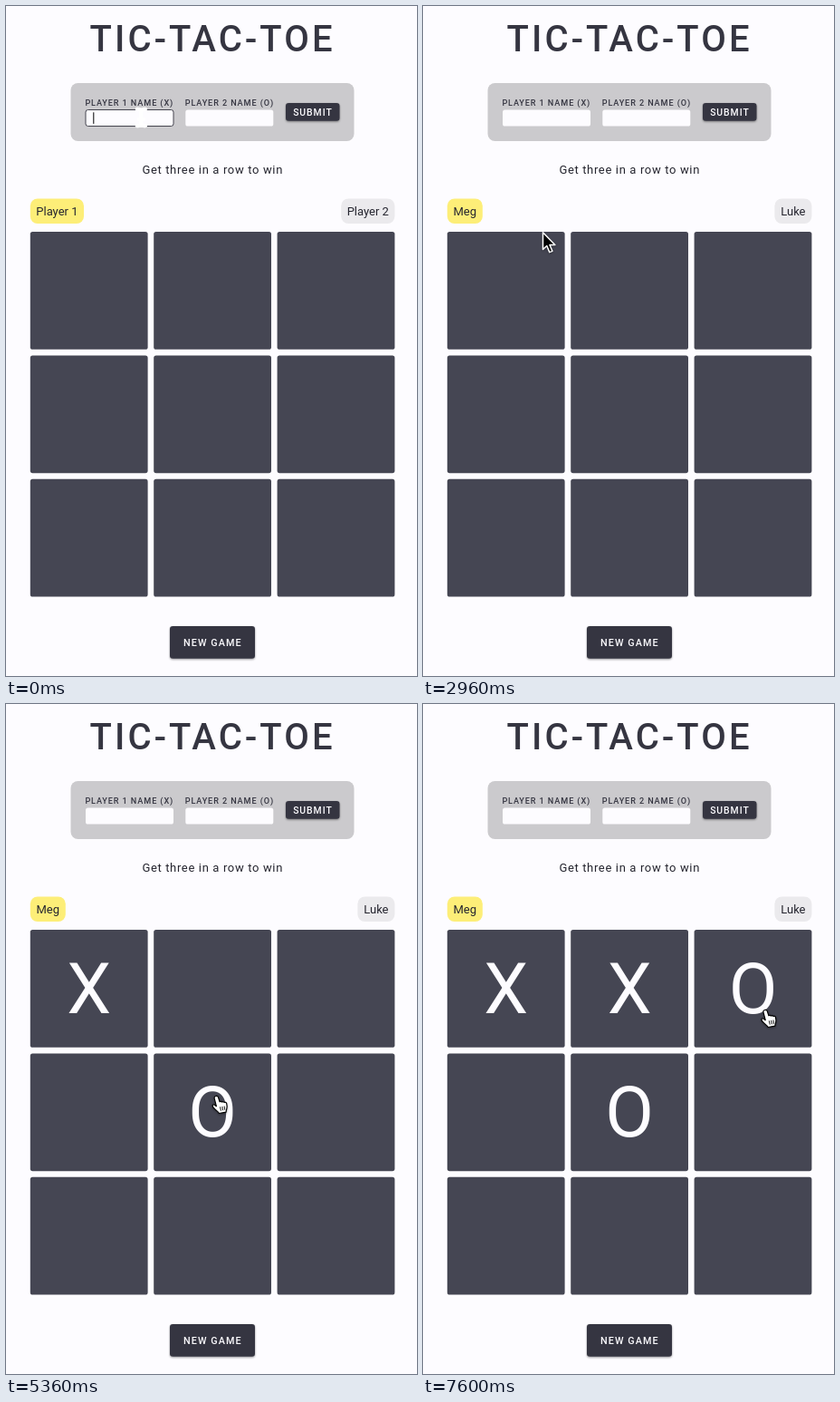
These frames come from a looping animation (454 by 739 pixels, 8000 ms). An HTML page:

```html
<!DOCTYPE html>
<html lang="en">
<head>
<meta charset="utf-8">
<title>Tic-Tac-Toe</title>
<style>
  html, body { margin: 0; width: 100%; height: 100%; overflow: hidden; background: #fdfcff; }
  svg { display: block; width: 100%; height: 100%; font-family: Roboto, sans-serif; }
  text { fill: #25252f; white-space: pre; }
  .mid { text-anchor: middle; }
  .title { font-size: 40px; font-weight: 500; letter-spacing: 3.2px; fill: #353541; }
  .label { font-size: 9.1px; font-weight: 500; letter-spacing: .91px; fill: #353541; }
  .hint { font-size: 13px; letter-spacing: .65px; }
  .name { font-size: 13px; }
  .typed { font-size: 12px; fill: #000; }
  .button rect { fill: #353541; filter: drop-shadow(0 1.5px 1.2px rgba(0, 0, 0, .42)); }
  .button text { fill: #fdfcff; font-weight: 500; }
  .mark { font-size: 78px; fill: #fdfcff; }
</style>
</head>
<body>
<svg id="stage" viewBox="0 0 454 739">
  <rect width="454" height="739" fill="#fdfcff"/>
  <text class="title mid" x="228.2" y="50">TIC-TAC-TOE</text>

  <rect x="71.5" y="85" width="313" height="64" rx="8" fill="#cbcacd"/>
  <text class="label" x="87.4" y="109.7">PLAYER 1 NAME (X)</text>
  <text class="label" x="197.7" y="109.7">PLAYER 2 NAME (O)</text>
  <g id="fields"></g>
  <rect id="caret" y="117.3" width="1" height="12.6" fill="#000"/>
  <g class="button">
    <rect id="submit" x="309" y="107" width="59.5" height="19.7" rx="3.3"/>
    <text class="mid" x="338.9" y="120.6" font-size="10.4" letter-spacing=".95">SUBMIT</text>
  </g>

  <text class="hint mid" x="228.2" y="185.4">Get three in a row to win</text>
  <g id="pills"></g>
  <g id="cells" fill="#454653"></g>
  <g id="marks"></g>

  <g class="button">
    <rect x="181" y="684" width="94" height="35.7" rx="3.3"/>
    <text class="mid" x="228.4" y="705.6" font-size="10.8" letter-spacing="1.08">NEW GAME</text>
  </g>

  <g id="pointer">
    <g id="beam" fill="none" stroke-linecap="round">
      <path id="beamShape" stroke="#fff" stroke-width="4"
        d="M-4.5 -9.3C-2 -9.3 0 -8.6 0 -6.8C0 -8.6 2 -9.3 4.5 -9.3M0 -6.8V6.8M-4.5 9.3C-2 9.3 0 8.6 0 6.8C0 8.6 2 9.3 4.5 9.3M-2.8 2H2.8"/>
      <use href="#beamShape" style="stroke:#000"/>
    </g>
    <path id="arrow" fill="#000" stroke="#fff" stroke-width="1.5" stroke-linejoin="round"
      style="filter:drop-shadow(0 1px 1px rgba(0,0,0,.35))"
      d="M.9 1V19.8L5.2 15.8L8.2 22.9L11.3 21.6L8.4 14.7H14.3Z"/>
    <g id="hand" transform="translate(-5.5 -.5)" stroke="#000" stroke-width="1.2"
      stroke-linejoin="round" stroke-linecap="round"
      style="filter:drop-shadow(0 1px .8px rgba(0,0,0,.35))">
      <path fill="#fff" d="M4.6 1C5.9.5 6.9 1.2 7.3 2.4L8.9 7.2C9.6 6.6 11 6.7 11.4 7.6C12.2 6.9 13.5 7.1 13.9 8C14.9 7.4 16.2 7.9 16.5 9.2C17 11.3 17.2 13.3 16.6 15C16.2 16.2 15.9 17 15.9 18.6L8.2 20C7.4 18.2 5.4 17 3.6 15.4C2.3 14.2 1 12.6.9 11.6C.9 10.3 2.3 9.9 3.4 10.7L5.2 12.2L3 3.6C2.6 2.4 3.3 1.4 4.6 1Z"/>
      <path fill="none" stroke-width=".9" d="M9.4 13.2l.8 3.6M11.7 12.8l.7 3.6M14 12.4l.5 3.5"/>
    </g>
  </g>
</svg>
<script>
const LOOP = 8000;
const SUBMIT_AT = 2040;
const LEFT = 26.8, RIGHT = 429.4, TOP = 249, PITCH = 136.4, CELL = 129.8;
const NAMES = ["Meg", "Luke"];
const NAME_WIDTHS = [39, 41];

const KEYS = [[40, 210, 380], [920, 1040, 1160, 1280]];
const FOCUS_SECOND = 680;
const MOVES = [[3320, 0, "X"], [4480, 4, "O"], [5960, 1, "X"], [7520, 2, "O"]];

const ease = {
  both: u => u * u * (3 - 2 * u),
  out: u => 1 - (1 - u) ** 2
};
// time, tip x, tip y, easing towards this stop
const PATH = [
  [0, 149.3, 123],
  [1320, 149.3, 123, "both"],
  [1780, 334.5, 118, "both"],
  [2700, 334.5, 118, "both"],
  [2960, 132, 248, "both"],
  [3080, 106, 292, "out"],
  [3620, 106, 292, "both"],
  [4040, 229.5, 461, "both"],
  [5260, 229.5, 461, "both"],
  [5600, 244.5, 324.5, "both"],
  [6380, 244.5, 324.5, "both"],
  [6840, 319.5, 517.5, "both"],
  [6900, 322, 521, "both"],
  [7200, 380, 342, "both"],
  [7320, 378.5, 337, "out"],
  [LOOP, 378.5, 337, "both"]
];

const $ = id => document.getElementById(id);

function add(parent, tag, attrs) {
  const el = document.createElementNS("http://www.w3.org/2000/svg", tag);
  for (const k in attrs) el.setAttribute(k, attrs[k]);
  return parent.appendChild(el);
}

const show = (el, on) => el.setAttribute("visibility", on ? "visible" : "hidden");

const fields = [88, 198.3].map(x => ({
  x,
  box: add($("fields"), "rect", { x, y: 114.5, width: 97, height: 18, rx: 2.6, fill: "#fdfcff" }),
  text: add($("fields"), "text", { class: "typed", x: x + 8, y: 127.7 })
}));

const pills = [0, 1].map(() => ({
  box: add($("pills"), "rect", { y: 212.5, height: 27.6, rx: 8 }),
  text: add($("pills"), "text", { class: "name mid", y: 231.3 })
}));

const cellPos = i => [LEFT + (i % 3) * PITCH, TOP + Math.floor(i / 3) * PITCH];
for (let i = 0; i < 9; i++) {
  const [x, y] = cellPos(i);
  add($("cells"), "rect", { x, y, width: CELL, height: CELL, rx: 2.6 });
}

const marks = MOVES.map(([, i, sign]) => {
  const [x, y] = cellPos(i);
  const el = add($("marks"), "text", { class: "mark mid", x: x + CELL / 2, y: y + CELL / 2 + 26.6 });
  el.textContent = sign;
  return el;
});

function tipAt(t) {
  const i = PATH.findIndex((p, n) => n && t < p[0]);
  const [t0, x0, y0] = PATH[i - 1];
  const [t1, x1, y1, kind] = PATH[i];
  const u = ease[kind]((t - t0) / (t1 - t0));
  return [x0 + (x1 - x0) * u, y0 + (y1 - y0) * u];
}

const inside = (x, y, l, t, r, b) => x >= l && x <= r && y >= t && y <= b;

function drawForm(t) {
  const sent = t >= SUBMIT_AT;
  const focus = sent ? -1 : t < FOCUS_SECOND ? 0 : 1;
  fields.forEach((f, i) => {
    const count = sent ? 0 : KEYS[i].filter(k => t >= k).length;
    f.text.textContent = NAMES[i].slice(0, count);
    f.box.setAttribute("stroke", focus === i ? "#45454f" : "none");
    if (focus === i) {
      const w = count ? f.text.getComputedTextLength() : 0;
      $("caret").setAttribute("x", f.x + 8.3 + w);
    }
  });
  show($("caret"), focus >= 0 && t < 1700);
}

function drawPills(t) {
  const turn = MOVES.filter(m => t >= m[0]).length % 2;
  pills.forEach((p, i) => {
    const named = t >= SUBMIT_AT;
    const width = named ? NAME_WIDTHS[i] : 59.2;
    const x = i ? RIGHT - width : LEFT;
    p.text.textContent = named ? NAMES[i] : "Player " + (i + 1);
    p.text.setAttribute("x", x + width / 2);
    p.box.setAttribute("x", x);
    p.box.setAttribute("width", width);
    p.box.setAttribute("fill", turn === i ? "#fdee78" : "#ebeaed");
  });
}

function drawPointer(t) {
  const [x, y] = tipAt(t);
  const onSubmit = inside(x, y, 309, 107, 368.5, 127);
  const onGrid = inside(x, y, LEFT, TOP, RIGHT, 651);
  const onField = fields.some(f => inside(x, y, f.x, 114, f.x + 97, 133));
  const kind = onSubmit || onGrid ? "hand" : onField ? "beam" : "arrow";
  const hidden = t >= 40 && t < 1320;   // the pointer hides while typing
  for (const id of ["hand", "beam", "arrow"]) show($(id), !hidden && id === kind);
  $("pointer").setAttribute("transform", `translate(${x} ${y})`);
  $("submit").style.fill = onSubmit ? "#42424f" : "";
}

function draw() {
  const t = performance.now() % LOOP;
  drawForm(t);
  drawPills(t);
  marks.forEach((m, i) => show(m, t >= MOVES[i][0]));
  drawPointer(t);
  requestAnimationFrame(draw);
}
draw();
</script>
</body>
</html>
```
